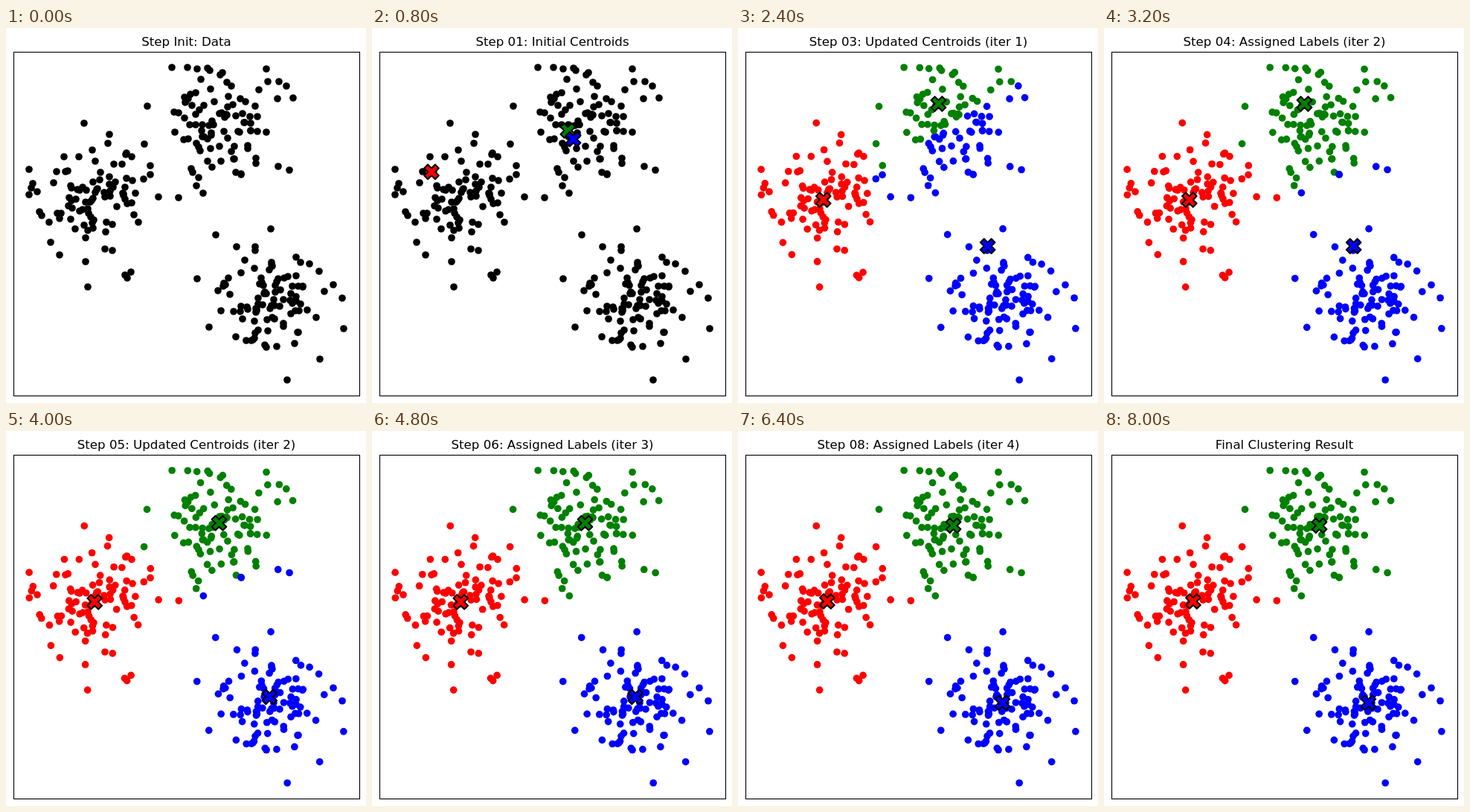
Recreate the animation shown at these times as an HTML page with a canvas. Size 484x504 px, loop 8.8 s.

```html
<!DOCTYPE html>
<html>
<head>
<meta charset="utf-8">
<style>
  html, body { margin: 0; width: 100%; height: 100%; overflow: hidden; background: #fff; }
  canvas { display: block; }
</style>
</head>
<body>
<canvas id="stage" width="484" height="504"></canvas>
<script>
const ctx = document.getElementById('stage').getContext('2d');
const STEP_MS = 800, COLORS = ['red', 'green', 'blue'];

// Mersenne Twister, seed 0
const mt = new Uint32Array(624);
let pos = 624;
for (let i = 1; i < 624; i++)
  mt[i] = Math.imul(1812433253, mt[i - 1] ^ (mt[i - 1] >>> 30)) + i;

function nextInt() {
  if (pos === 624) {
    for (let i = 0; i < 624; i++) {
      const y = (mt[i] & 0x80000000) | (mt[(i + 1) % 624] & 0x7fffffff);
      mt[i] = mt[(i + 397) % 624] ^ (y >>> 1) ^ (y & 1 ? 0x9908b0df : 0);
    }
    pos = 0;
  }
  let y = mt[pos++];
  y ^= y >>> 11;
  y ^= (y << 7) & 0x9d2c5680;
  y ^= (y << 15) & 0xefc60000;
  return (y ^ (y >>> 18)) >>> 0;
}

function random() {
  const a = nextInt() >>> 5, b = nextInt() >>> 6;
  return (a * 67108864 + b) / 9007199254740992;
}

// Polar method: two independent normal values
function gaussPair() {
  let a, b, r;
  do {
    a = 2 * random() - 1;
    b = 2 * random() - 1;
    r = a * a + b * b;
  } while (r >= 1 || r === 0);
  const f = Math.sqrt(-2 * Math.log(r) / r);
  return [f * b, f * a];
}

// Three blobs of 100 points
const blobs = COLORS.map(() => [20 * random() - 10, 20 * random() - 10]);
const points = blobs.flatMap(([cx, cy]) => Array.from({ length: 100 }, () => {
  const [gx, gy] = gaussPair();
  return [cx + 0.6 * gx, cy + 0.6 * gy];
}));

const range = k => {
  const v = points.map(p => p[k]);
  return [Math.min(...v), Math.max(...v)];
};
const [x0, x1] = range(0), [y0, y1] = range(1);
const toPx = ([x, y]) => [
  10 + 465 * (1 / 22 + (x - x0) / (x1 - x0) / 1.1),
  494 - 462 * (1 / 22 + (y - y0) / (y1 - y0) / 1.1)
];

// k-means
const dist = (a, b) => Math.hypot(a[0] - b[0], a[1] - b[1]);
const nearest = (p, list) => list.reduce((best, q, i) => dist(p, q) < dist(p, list[best]) ? i : best, 0);
const assign = centers => points.map(p => nearest(p, centers));
const update = labels => COLORS.map((_, k) => {
  const own = points.filter((_, i) => labels[i] === k);
  return [0, 1].map(d => own.reduce((s, p) => s + p[d], 0) / own.length);
});

let centers = [points[nearest([80.3, 192.8], points.map(toPx))], points[59], points[19]];
let labels = null;
const steps = [
  { title: 'Step Init: Data', centers: [], labels },
  { title: 'Step 01: Initial Centroids', centers, labels }
];
const addStep = (what, iter) => steps.push({
  title: `Step 0${steps.length}: ${what} (iter ${iter})`, centers, labels
});
for (let iter = 1; iter <= 4; iter++) {
  labels = assign(centers);
  addStep('Assigned Labels', iter);
  centers = update(labels);
  addStep('Updated Centroids', iter);
}
steps.push({ title: 'Final Clustering Result', centers, labels });

const dot = new Path2D();
dot.arc(0, 0, 4.84, 0, 2 * Math.PI);

const U = 19.64 / 4;
const cross = new Path2D();
[[-1, -2], [0, -1], [1, -2], [2, -1], [1, 0], [2, 1], [1, 2], [0, 1], [-1, 2], [-2, 1], [-1, 0], [-2, -1]]
  .forEach(([x, y]) => cross.lineTo(x * U, y * U));
cross.closePath();

function stamp(path, [x, y], color, outline) {
  ctx.setTransform(1, 0, 0, 1, x, y);
  ctx.fillStyle = color;
  ctx.fill(path);
  if (outline) ctx.stroke(path);
  ctx.resetTransform();
}

function draw({ title, centers, labels }) {
  ctx.fillStyle = '#fff';
  ctx.fillRect(0, 0, 484, 504);
  points.forEach((p, i) => {
    const px = toPx(p);
    if (labels) stamp(dot, px, COLORS[labels[i]]);
    else stamp(dot, px.map(Math.round), 'black');
  });
  ctx.strokeStyle = 'black';
  ctx.lineJoin = 'round';
  ctx.lineWidth = 2.08;
  centers.forEach((c, k) => stamp(cross, toPx(c), COLORS[k], true));
  ctx.lineJoin = 'miter';
  ctx.lineWidth = 1.11;
  ctx.strokeRect(10.5, 32.5, 465, 462);
  ctx.fillStyle = 'black';
  ctx.font = '16.667px "DejaVu Sans", sans-serif';
  ctx.textAlign = 'center';
  ctx.fillText(title, 242.5, 24);
}

function tick() {
  draw(steps[Math.floor(performance.now() / STEP_MS) % steps.length]);
  requestAnimationFrame(tick);
}
tick();
</script>
</body>
</html>
```
